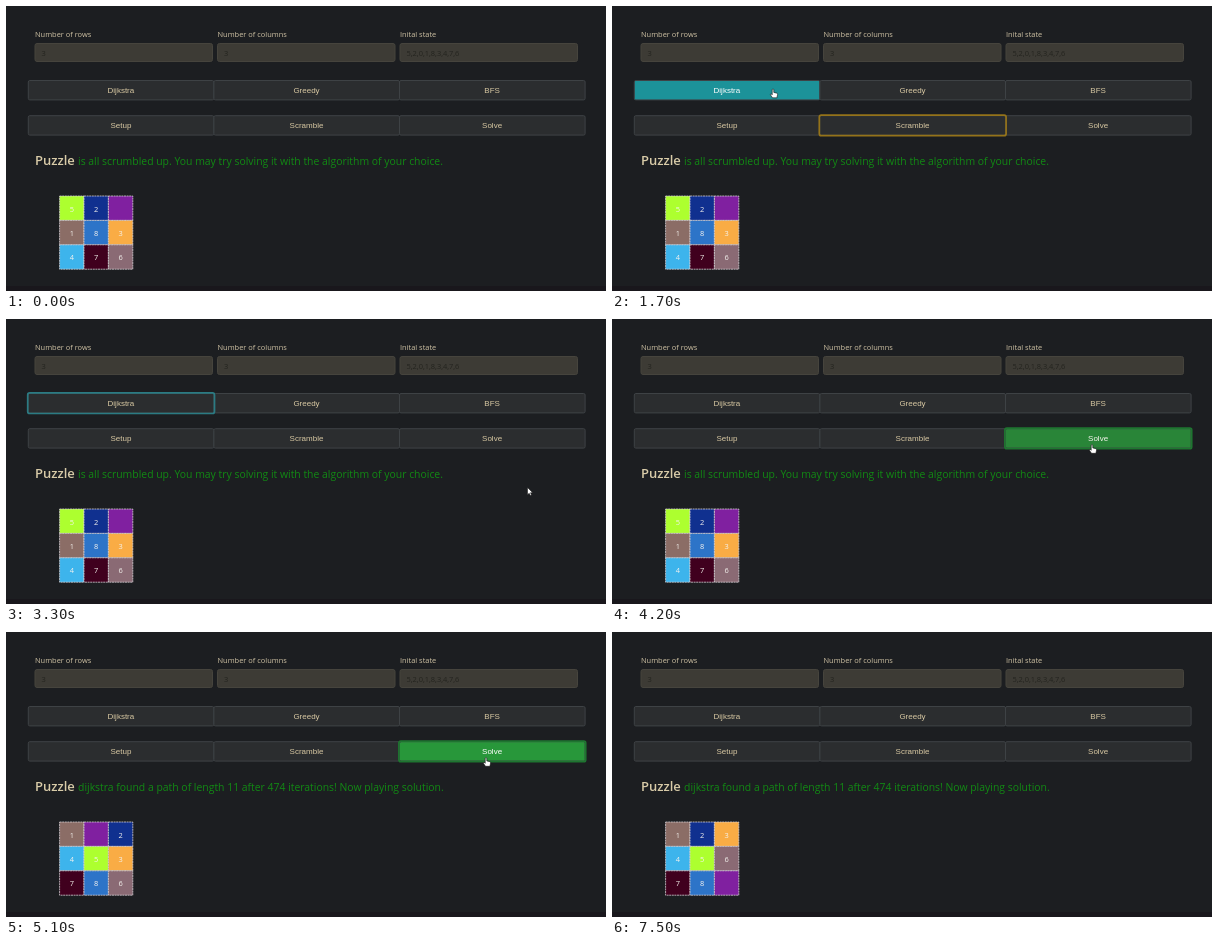
Write an HTML page that moves like this. It is 600 by 285 pixels and loops after 7900 ms.

```html
<!DOCTYPE html>
<html lang="en">
<head>
<meta charset="utf-8">
<title>Sliding puzzle solver</title>
<style>
html, body { margin: 0; width: 100%; height: 100%; overflow: hidden; background: #1c1e21; }
svg { display: block; width: 600px; height: 285px; }
text { font-family: "Open Sans", "Noto Sans", sans-serif; font-size: 7.45px; }
.label { fill: #d0c3a5; }
.field { fill: #3d3b35; stroke: #46443d; }
.value { fill: #24241f; }
.button { stroke: #3e4245; }
.caption { font-family: "Liberation Sans", Arial, sans-serif; font-size: 8px; text-anchor: middle; }
.ring { fill: none; stroke-width: 1.7; }
.title { font-size: 13px; font-weight: 600; fill: #d8cba8; }
.message { font-size: 10.41px; fill: #128a14; }
.digit { fill: #f4f2ee; text-anchor: middle; }
</style>
</head>
<body>
<svg id="stage" viewBox="0 0 600 285"></svg>
<script>
const LOOP = 7900, STEP = 100;
const stage = document.getElementById("stage");

function add(tag, attrs, text, parent = stage) {
  const el = document.createElementNS("http://www.w3.org/2000/svg", tag);
  for (const key in attrs) el.setAttribute(key, attrs[key]);
  if (text) el.textContent = text;
  parent.appendChild(el);
  return el;
}

const clamp = v => Math.max(0, Math.min(1, v));
const ramp = (t, from, to) => clamp((t - from) / (to - from));
const within = (t, from, to) => t >= from && t < to;
const mix = (a, b, k) => `rgb(${a.map((v, i) => Math.round(v + (b[i] - v) * k))})`;
const show = (el, on) => el.setAttribute("visibility", on ? "visible" : "hidden");

add("rect", { y: 280, width: 600, height: 5, fill: "#19171c" });

// Form fields
[["Number of rows", "3"], ["Number of columns", "3"], ["Inital state", "5,2,0,1,8,3,4,7,6"]]
  .forEach(([label, value], i) => {
    const x = 29 + i * 182.5;
    add("text", { x, y: 30.5, class: "label" }, label);
    add("rect", { x, y: 37.5, width: 177.5, height: 18, rx: 2, class: "field" });
    add("text", { x: x + 6.5, y: 49.5, class: "value" }, value);
  });

// Buttons
const IDLE = [43, 45, 47], TAN = [217, 201, 163], WHITE = [255, 255, 255];

function makeButton(name, col, row) {
  const x = 22.3 + col * 185.6, y = row ? 109.7 : 74.5;
  const box = add("rect", { x, y, width: 185.6, height: 19.4, rx: 1.5, class: "button" });
  const caption = add("text", { x: x + 92.6, y: y + 12.6, class: "caption" }, name);
  return { x, y, box, caption };
}

const buttons = {};
["Dijkstra", "Greedy", "BFS", "Setup", "Scramble", "Solve"].forEach((name, i) => {
  buttons[name] = makeButton(name, i % 3, i > 2 ? 1 : 0);
});

function makeRing(name, stroke) {
  const { x, y } = buttons[name];
  return add("rect", { x: x - 0.6, y: y - 0.6, width: 186.8, height: 20.6, rx: 2, class: "ring", stroke });
}
const rings = [
  { el: makeRing("Scramble", "#94731a"), from: 200, to: 2100 },
  { el: makeRing("Dijkstra", "#2b7b83"), from: 2100, to: 4100 },
  { el: makeRing("Solve", "#1e7530"), from: 4100, to: 7300 }
];

function tint(name, color, k) {
  const { box, caption } = buttons[name];
  box.setAttribute("fill", mix(IDLE, color, k));
  caption.setAttribute("fill", mix(TAN, WHITE, k));
}

// Status line
add("text", { x: 29, y: 158.5, class: "title" }, "Puzzle");
const message = add("text", { x: 72, y: 158.5, class: "message" });
const SCRAMBLED = "is all scrumbled up. You may try solving it with the algorithm of your choice.";
const SOLVED = "dijkstra found a path of length 11 after 474 iterations! Now playing solution.";

// Puzzle: each move swaps the blank with the named tile
const COLORS = ["#8020a0", "#8b6d66", "#10308f", "#f9ac45", "#3db4ec",
  "#adff2f", "#8a6a74", "#40001e", "#2d74c8"];
const START = [5, 2, 0, 1, 8, 3, 4, 7, 6];
const MOVES = [2, 5, 1, 4, 7, 8, 5, 2, 3, 6];
const SOLVE_AT = 4400, CELL = 24.4;

const cells = START.map((_, i) => {
  const x = 53.6 + (i % 3) * CELL, y = 190 + Math.floor(i / 3) * CELL;
  return {
    box: add("rect", { x, y, width: CELL, height: CELL, stroke: "#d2cdd2", "stroke-width": 0.8, "stroke-dasharray": "2 0.6" }),
    digit: add("text", { x: x + CELL / 2, y: y + 15.6, class: "digit" })
  };
});

function board(count) {
  const state = START.slice();
  for (const tile of MOVES.slice(0, count)) {
    const a = state.indexOf(0), b = state.indexOf(tile);
    state[a] = tile;
    state[b] = 0;
  }
  return state;
}

// Pointer
const PATH = [
  [100, 290, 215], [500, 290, 205], [900, 245, 168], [1000, 245, 168], [1500, 161, 83],
  [2200, 161, 83], [2800, 440, 152], [3100, 539, 176], [3300, 521.5, 168.5],
  [3600, 519, 160], [4000, 480, 125.5], [5700, 480, 125.5], [5900, 468, 148.5],
  [6300, 448, 172], [7300, 436, 188]
];

const arrow = add("path", {
  d: "M0 0V7.2L1.7 5.7L2.8 8L4 7.4L3 5.2H5.2Z",
  fill: "#fff", stroke: "#111", "stroke-width": 0.5
});
const hand = add("path", {
  d: "M-.8 .5Q0 -.6 .8 .5V3.4L4 4.2Q4.8 4.5 4.6 5.5L3.9 8.8H-.5L-2.6 5.7Q-2.7 4.7 -1.6 5L-.8 5.8Z",
  fill: "#fff", stroke: "#111", "stroke-width": 0.6
});

function pointerAt(t) {
  let i = 0;
  while (i < PATH.length - 2 && t >= PATH[i + 1][0]) i++;
  const [t0, x0, y0] = PATH[i], [t1, x1, y1] = PATH[i + 1];
  const p = ramp(t, t0, t1), k = p * p * (3 - 2 * p);
  return [x0 + (x1 - x0) * k, y0 + (y1 - y0) * k];
}

function drawPointer(t) {
  const [x, y] = pointerAt(t);
  const on = within(t, 100, 7300);
  const over = within(y, 74, 94) || within(y, 109, 130);
  show(arrow, on && !over);
  show(hand, on && over);
  for (const el of [arrow, hand]) el.setAttribute("transform", `translate(${x} ${y})`);
}

function draw(t) {
  for (const name in buttons) tint(name, IDLE, 0);
  tint("Dijkstra", [28, 146, 153], ramp(t, 1350, 1600) - ramp(t, 2250, 2500));
  tint("Solve", [40, 151, 58], ramp(t, 3950, 4250) - ramp(t, 5830, 6030));
  for (const { el, from, to } of rings) show(el, within(t, from, to));

  message.textContent = t < SOLVE_AT ? SCRAMBLED : SOLVED;
  const count = Math.max(0, Math.min(MOVES.length, Math.floor((t - SOLVE_AT) / 100)));
  board(count).forEach((tile, i) => {
    cells[i].box.setAttribute("fill", COLORS[tile]);
    cells[i].digit.textContent = tile || "";
  });
  drawPointer(t);
}

function frame() {
  draw(Math.floor((performance.now() % LOOP) / STEP) * STEP);
  requestAnimationFrame(frame);
}
frame();
</script>
</body>
</html>
```
